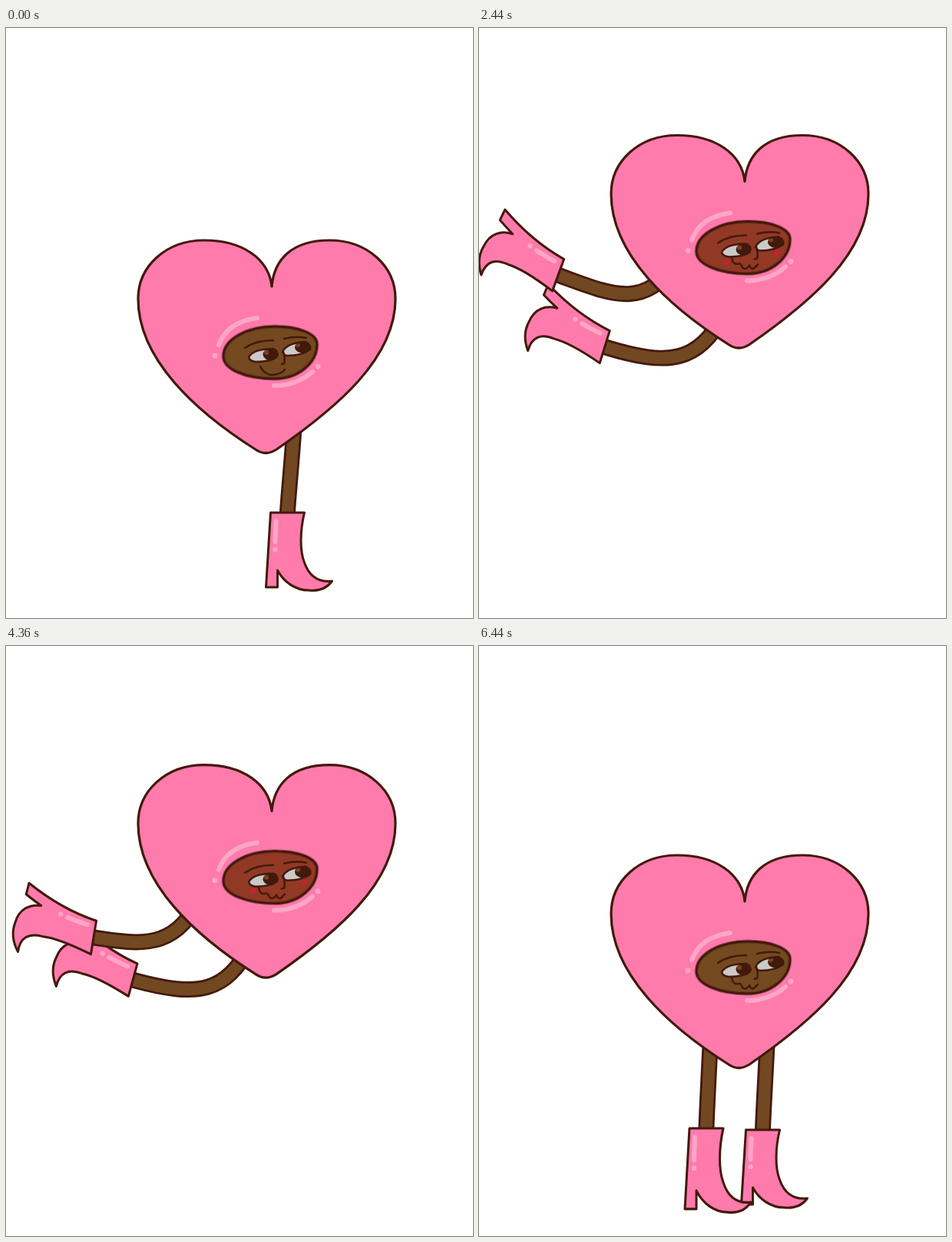
Animation, 608 px wide and 767 px high, one loop 7960 ms. Source, as an HTML page with a canvas:

```html
<!DOCTYPE html>
<html lang="en">
<head>
<meta charset="utf-8">
<title>Floating heart</title>
<style>
html, body { margin: 0; width: 100%; height: 100%; overflow: hidden; background: #fff; }
canvas { display: block; }
</style>
</head>
<body>
<canvas id="stage" width="608" height="767"></canvas>
<script>
const ctx = document.getElementById('stage').getContext('2d');
const LOOP = 7960, STEP = 40, REST = 6440, GROUND = 270;
const INK = '#43190c', PINK = '#ff7bac', SHINE = '#ffa6c5', SKIN = '#724822', BLUSH = '#c92236';

const path = d => new Path2D(d);
const heart = path('M346 336C342 300 308 276 258 276C208 276 172 310 172 352C172 430 246 498 325 548' +
  'Q338 557 352 548C430 494 507 430 507 352C507 310 471 276 421 276C371 276 349 302 346 336Z');
const face = path('M283 427C283 405 313 388 350 388C380 388 405 397 405 411C405 436 380 456 350 456C313 456 283 444 283 427Z');
const shine = path('M277 412Q288 382 327 377M349 465Q378 465 399 447');
const eyes = path('M316 428Q322 417 348 417Q355 420 353 427Q345 434 325 434Q317 433 316 428Z' +
  'M360 421Q366 409 390 408Q398 412 396 418Q385 426 366 426Q361 425 360 421Z');
const features = path('M311 416Q325 406 348 406M362 404Q378 400 391 403M361 421Q364 430 362 436L359 437');
const smile = path('M331 440Q336 451 348 451Q358 450 363 444');
const wobble = path('M329 436Q331 445 338 443Q341 442 343 448Q348 452 352 445Q355 452 359 448L363 444');

// Boot outline as cubic curves, from the front of the cuff round to the back
const boot = [22, 0, 16, 25, 16, 50, 22, 65, 28, 82, 40, 91, 58, 89, 50, 100, 38, 102, 28, 101,
  10, 101, -5, 90, -13, 75, -13, 82, -13, 90, -13, 97, -18, 97, -23, 97, -28, 97, -26, 65, -24, 32, -22, 0];
const bootShine = [-15, 11, -15, 20, -16, 29, -16, 38];

const mix = (a, b, u) => a + (b - a) * u;
const ease = u => (1 - Math.cos(Math.PI * Math.max(0, Math.min(1, u)))) / 2;

// Eased swing from one turning point [time, value] to the next
function swing(turns, t) {
  return turns.reduce((value, [end, next], i) => {
    if (!i) return next;
    const begin = turns[i - 1][0];
    return t > begin ? mix(value, next, ease((t - begin) / (end - begin))) : value;
  }, 0);
}

const heartTop = [[450, 274], [1410, 231], [2380, 137], [3510, 209], [4740, 137], [6300, GROUND]];

// Positions are measured from the top of the heart; slide gives [linear, square] drift beyond the full swing
const left = {
  turns: [[760, 0], [1240, 83], [2600, 111], [3700, 86], [5000, 112], [5800, 88], [6300, 0]],
  full: 83, stand: [296, 357], fly: [135, 272], hipStand: [302, 230], hipFly: [258, 166],
  slideX: [-1.45, .01], slideY: [-2.1, -.043], reach: 75, bend: 20, tall: 1.08
};
const right = {
  turns: [[760, 0], [1240, 76], [2250, 109], [3500, 76], [4600, 109], [5750, 76], [6300, 0]],
  full: 76, stand: [369.5, 359], fly: [210.5, 350], hipStand: [376, 230], hipFly: [319, 236],
  slideX: [-2.25, .024], slideY: [-2.34, 0], reach: 90, bend: 7, tall: 1
};

function stroke(shape, color, width) {
  ctx.strokeStyle = color;
  ctx.lineWidth = width;
  ctx.stroke(shape);
}

function fill(shape, color) {
  ctx.fillStyle = color;
  ctx.fill(shape);
}

function oval(x, y, rx, ry, color) {
  const shape = new Path2D();
  shape.ellipse(x, y, rx, ry, 0, 0, 7);
  fill(shape, color);
}

// Bends the foot backwards while flying
const bent = (x, y, u) => [x - .003 * y * y * u, y + .001 * x * y * u];

function bentPath(points, u) {
  const shape = new Path2D();
  const at = i => bent(points[i], points[i + 1], u);
  shape.moveTo(...at(0));
  for (let i = 2; i < points.length; i += 6) shape.bezierCurveTo(...at(i), ...at(i + 2), ...at(i + 4));
  return shape;
}

function drawLeg(leg, t, top, dx, dy) {
  const angle = swing(leg.turns, t), a = angle * Math.PI / 180;
  const u = Math.min(1, angle / leg.full), over = Math.max(0, angle - leg.full);
  const slide = ([linear, square]) => linear * over + square * over * over;
  const x = mix(leg.stand[0], leg.fly[0], u) + slide(leg.slideX) + dx;
  const y = mix(GROUND, top, u) + mix(leg.stand[1], leg.fly[1], u) + 25 * Math.sin(Math.PI * u) + slide(leg.slideY) + dy;
  const hipX = mix(leg.hipStand[0], leg.hipFly[0], u);
  const hipY = top + mix(leg.hipStand[1], leg.hipFly[1], u);
  const reach = mix(10, leg.reach, u);

  const limb = new Path2D();
  limb.moveTo(x, y);
  limb.bezierCurveTo(x + Math.sin(a) * reach, y - Math.cos(a) * reach,
    hipX - mix(2, leg.bend + .9 * over, u), hipY + mix(40, 85 - .8 * over, u), hipX, hipY);
  stroke(limb, INK, 21);
  stroke(limb, SKIN, 15.5);

  ctx.save();
  ctx.translate(x, y);
  ctx.rotate(a);
  ctx.scale(1, mix(leg.tall, 1, u));
  const shape = bentPath(boot, u);
  shape.closePath();
  fill(shape, PINK);
  stroke(shape, INK, 3);
  stroke(bentPath(bootShine, u), SHINE, 6);
  oval(...bent(-16, 48, u), 3.2, 3.2, SHINE);
  ctx.restore();
}

function drawHeart(top, blush, shy) {
  ctx.save();
  ctx.translate(0, top - 274);
  fill(heart, PINK);
  stroke(heart, INK, 3.2);
  stroke(shine, SHINE, 6);
  oval(272, 426, 3.4, 3.4, SHINE);
  oval(406, 440, 3.4, 3.4, SHINE);

  fill(face, `rgb(${mix(117, 145, blush)},${mix(73, 57, blush)},${mix(32, 37, blush)})`);
  stroke(face, 'rgba(67,25,12,.35)', 5);
  stroke(face, INK, 2.8);
  ctx.globalAlpha = blush * .75;
  oval(322, 440, 4.5, 4, BLUSH);
  oval(388, 429, 4.5, 4, BLUSH);
  ctx.globalAlpha = 1;

  fill(eyes, '#cbcac8');
  oval(344.5, 424.5, 10, 7.5, INK);
  oval(386.5, 415, 10.5, 7.5, INK);
  oval(339, 422, 3, 3, '#74451f');
  oval(380, 412, 3, 3, '#74451f');
  stroke(eyes, INK, 2.5);
  stroke(features, INK, 2.5);
  stroke(shy ? wobble : smile, INK, 2.5);
  ctx.restore();
}

function draw(now) {
  const t = Math.min(REST, Math.floor(now % LOOP / STEP) * STEP);
  const top = swing(heartTop, t), lift = 1 - ease(t / 360);
  const blush = swing([[840, 0], [1200, 1], [5700, 1], [6300, 0]], t);
  ctx.fillStyle = '#fff';
  ctx.fillRect(0, 0, 608, 767);
  ctx.lineJoin = 'round';
  ctx.lineCap = 'round';
  drawLeg(right, t, top, -3 * lift, lift);
  drawLeg(left, t, top, 0, -250 * lift);
  drawHeart(top, blush, t >= 840);
}

let start;
function tick(now) {
  start ??= now;
  draw(now - start);
  requestAnimationFrame(tick);
}
draw(0);
requestAnimationFrame(tick);
</script>
</body>
</html>
```
